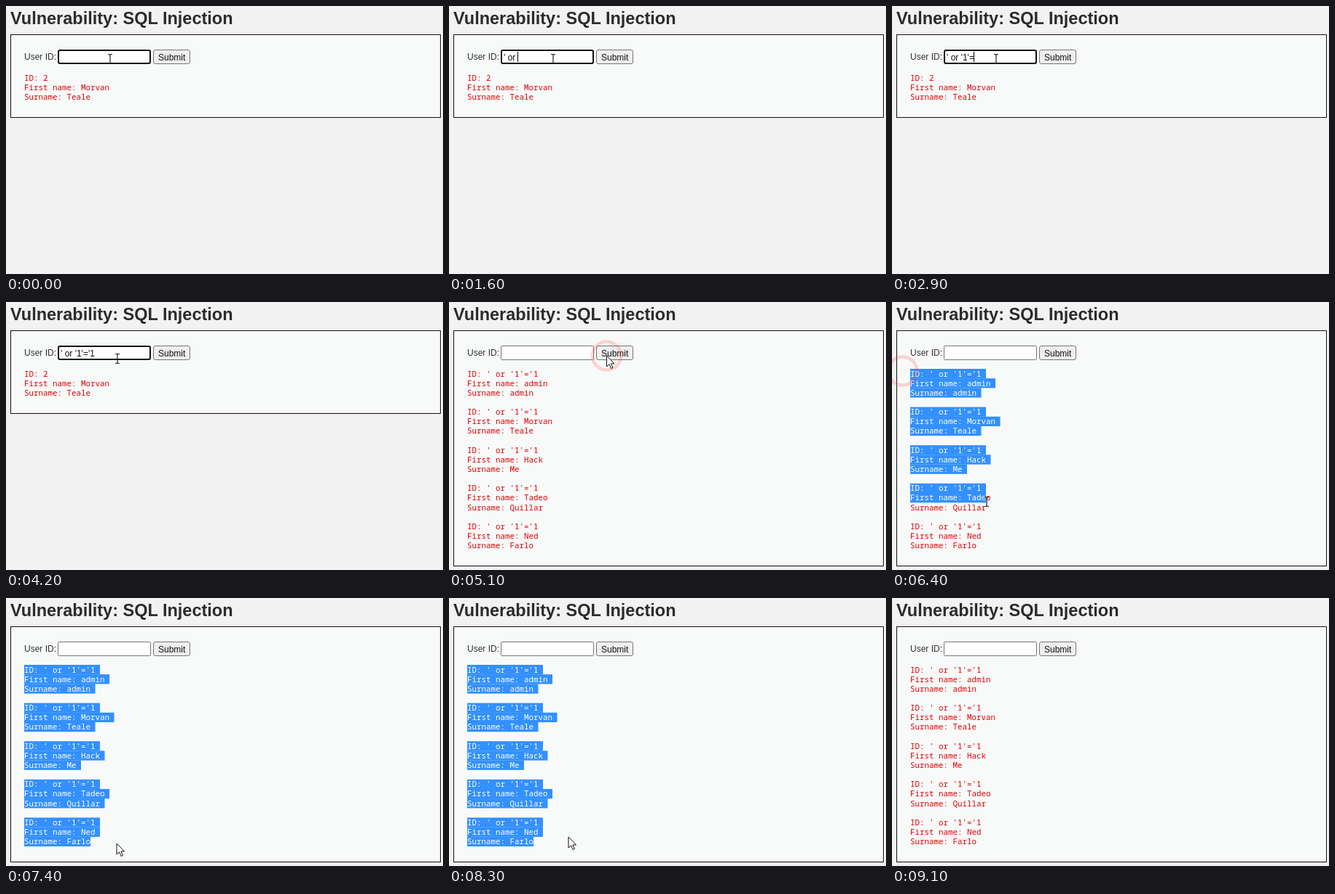
Write an HTML page that moves like this. It is 600x369 px and loops after 9300 ms.

```html
<!DOCTYPE html>
<html lang="en">
<head>
<meta charset="utf-8">
<title>Form demo</title>
<style>
  html, body { margin: 0; width: 100%; height: 100%; overflow: hidden; background: #f3f2f3; }
  svg { display: block; }
  text { white-space: pre; font: 12px "Liberation Sans", Arial, sans-serif; fill: #111; }
  .title { font-size: 23.5px; font-weight: bold; fill: #2b2b2b; }
  .label { fill: #333; }
  .result { font: 10.83px "Noto Sans Mono", monospace; fill: #e00000; }
  .result .picked { fill: #fff; }
</style>
</head>
<body>
<svg width="600" height="369" viewBox="0 0 600 369">
  <text class="title" x="6" y="24.5">Vulnerability: SQL Injection</text>
  <rect id="panel" x="6.5" y="39.5" width="590" fill="#f8fafa" stroke="#111"/>
  <text class="label" x="25" y="73.5">User ID:</text>
  <rect x="202.5" y="60.5" width="50" height="19" rx="2.5" fill="#efefef" stroke="#767676"/>
  <text x="209" y="74.5">Submit</text>
  <g id="live"></g>
</svg>
<script>
const LOOP = 9300, STEP = 100;
const SUBMIT = 4700, LOADED = 5000, DRAG = 6000, DROP = 6700, CLICK = 7700, CLEARED = 8400, HIDDEN = 9100;
const LEFT = 25, TOP = 92, LINE = 13.15, CHAR = 6.5;

const query = "' or '1'='1";
const keyTimes = [300, 700, 1000, 1200, 1600, 1900, 2200, 2600, 2900, 3300, 3500];

const record = (id, first, last) => [`ID: ${id}`, `First name: ${first}`, `Surname: ${last}`];
const firstResult = record("2", "Morvan", "Teale");
const allResults = [["admin", "admin"], ["Morvan", "Teale"], ["Hack", "Me"], ["Tadeo", "Quillar"], ["Ned", "Farlo"]]
  .flatMap(([first, last]) => [...record(query, first, last), ""]).slice(0, -1);

// Pointer path: time, x, y
const path = [
  [0, 143, 73], [4100, 143, 73], [4200, 153, 78], [4450, 192, 80], [SUBMIT, 216.5, 74],
  [5100, 216.5, 74], [5500, 105, 106], [5800, 14.5, 95], [DRAG, 14.5, 95], [6100, 86, 165],
  [6400, 130, 275], [DROP, 152, 338], [7400, 152, 338], [CLICK, 157.5, 343.5],
  [8200, 157.5, 343.5], [8300, 164, 329], [8800, 178, 300], [LOOP, 178, 300]
];

function pointerAt(t) {
  const i = Math.max(1, path.findIndex(p => p[0] >= t));
  const [t0, x0, y0] = path[i - 1], [t1, x1, y1] = path[i];
  const k = (t - t0) / (t1 - t0);
  return [x0 + (x1 - x0) * k, y0 + (y1 - y0) * k];
}

const panel = document.getElementById("panel");
const live = document.getElementById("live");
const ruler = document.createElement("canvas").getContext("2d");
ruler.font = '12px "Liberation Sans", Arial, sans-serif';

function field(t) {
  if (t >= SUBMIT) {
    const kept = t < LOADED ? `<text x="75" y="74.5">${query}</text>` : "";
    return `<rect x="71.5" y="60.5" width="127" height="19" rx="1" fill="#fff" stroke="#767676"/>${kept}`;
  }
  const count = keyTimes.filter(k => k <= t).length;
  const typed = query.slice(0, count);
  const lastKey = count ? keyTimes[count - 1] : -500;
  const caretX = Math.floor(75 + ruler.measureText(typed).width);
  const caret = (t - lastKey) % 1000 < 500 ? `<rect x="${caretX}" y="63" width="1" height="14"/>` : "";
  return `<rect x="72" y="61" width="126" height="18" rx="2" fill="#fff" stroke="#101010" stroke-width="2"/>
    <text x="75" y="74.5">${typed}</text>${caret}`;
}

function results(t) {
  const lines = t < LOADED ? firstResult : allResults;
  const selecting = t > DRAG && t < CLEARED;
  // The selection trails the pointer slightly
  const [x, y] = pointerAt(Math.max(0, Math.min(t - 15, DROP)));
  const endLine = Math.floor((y - TOP) / LINE);
  const endCol = Math.max(0, Math.round((x - LEFT) / CHAR));
  return lines.map((line, i) => {
    const whole = selecting && i < endLine && i < lines.length - 1;
    const picked = whole ? line.length : selecting && i <= endLine ? Math.min(endCol, line.length) : 0;
    const cells = line ? picked + (whole ? 1 : 0) : 0;
    const top = TOP + i * LINE;
    return `<rect x="${LEFT}" y="${top}" width="${cells * CHAR}" height="13.3" fill="#3390ff"/>
      <text class="result" x="${LEFT}" y="${top + 10.5}"><tspan class="picked">${line.slice(0, picked)}</tspan>${line.slice(picked)}</text>`;
  }).join("");
}

function ring(t, start) {
  const age = t - start;
  if (age < 0 || age > 500) return "";
  const [x, y] = pointerAt(start);
  return `<circle cx="${x}" cy="${y}" r="${7.2 + age * 0.031}" fill="none" stroke="#f33"
    stroke-width="4.5" opacity="${0.66 - age * 0.00115}"/>`;
}

function pointer(t) {
  if (t >= HIDDEN) return "";
  const [x, y] = pointerAt(t);
  const beam = (t < SUBMIT && x < 199) || (t > DRAG && t < DROP);
  const shape = beam
    ? '<path d="M-3-6.5h2l1 1 1-1h2M0-5.5v11M-3 6.5h2l1-1 1 1h2" fill="none" stroke="#222" stroke-width="1.2"/>'
    : '<path d="M0 0V15l3.5-3.3 2.6 5.8 2.3-1-2.5-5.6H10.5z" fill="#fff" stroke="#111"/>';
  return `<g transform="translate(${x} ${y})">${shape}</g>`;
}

function draw(t) {
  panel.setAttribute("height", t < LOADED ? 114 : 324);
  live.innerHTML = field(t) + results(t) +
    [SUBMIT, DRAG, CLICK].map(start => ring(t, start)).join("") + pointer(t);
}

let shown = -1;
function tick() {
  const t = Math.floor(performance.now() % LOOP / STEP) * STEP;
  if (t !== shown) draw(shown = t);
  requestAnimationFrame(tick);
}
tick();
</script>
</body>
</html>
```
